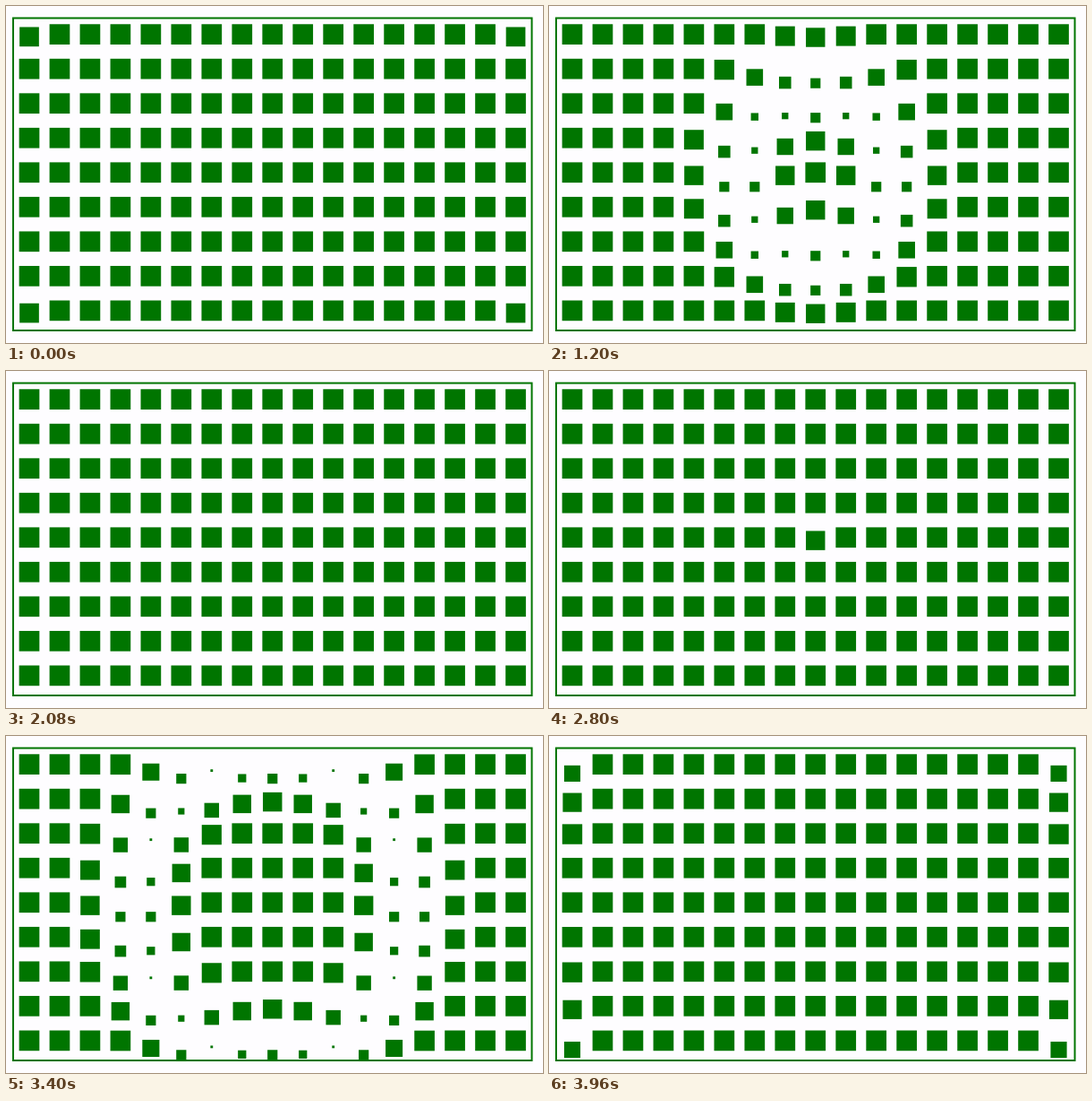
An HTML page for the animation above (4000 ms loop, 600x376 px).

```html
<!DOCTYPE html>
<html lang="en">
<head>
<meta charset="utf-8">
<title>Staggered grid</title>
<style>
  html, body { margin: 0; width: 100%; height: 100%; overflow: hidden; background: #fefdff; }
  svg { display: block; }
</style>
</head>
<body>
<svg id="stage" width="600" height="376" viewBox="0 0 600 376">
  <rect x="8" y="13.5" width="579.5" height="348.5" fill="none" stroke="#007500" stroke-width="2"/>
  <g id="grid" fill="#007500"></g>
</svg>
<script>
const COLS = 17, ROWS = 9, SIZE = 22.7;
const PITCH_X = 33.97, PITCH_Y = 38.53;
const CENTER_X = 297.75, CENTER_Y = 185.75;
const LOOP = 2000, START = 750, STAGGER = 100, HALF = 200;
const MIN_SCALE = 0.1, DROP = 64;

const grid = document.getElementById('grid');
const cells = [];

for (let row = 0; row < ROWS; row++) {
  for (let col = 0; col < COLS; col++) {
    const dx = col - (COLS - 1) / 2;
    const dy = row - (ROWS - 1) / 2;
    const el = document.createElementNS('http://www.w3.org/2000/svg', 'rect');
    grid.appendChild(el);
    cells.push({
      el,
      x: CENTER_X + dx * PITCH_X,
      y: CENTER_Y + dy * PITCH_Y,
      delay: START + STAGGER * Math.hypot(dx, dy)
    });
  }
}

// Quadratic shrink to MIN_SCALE, then the mirrored growth back to 1.
function scaleAt(t) {
  if (t >= 2 * HALF) return 1;
  const p = 1 - Math.abs(t - HALF) / HALF;
  return 1 - (1 - MIN_SCALE) * p * p;
}

function render(ms) {
  // 40 ms steps showing the latest 60 Hz tick
  const step = Math.floor(ms / 40 + 1e-6) * 40;
  const time = Math.floor(step * 0.06 + 1e-6) / 0.06;
  for (const { el, x, y, delay } of cells) {
    const local = (((time - delay) % LOOP) + LOOP) % LOOP;
    const s = scaleAt(local);
    const size = SIZE * s;
    // The offset is applied inside the scaled space, so it shrinks with s.
    const drop = s * DROP * (1 - s);
    el.setAttribute('x', x - size / 2);
    el.setAttribute('y', y + drop - size / 2);
    el.setAttribute('width', size);
    el.setAttribute('height', size);
  }
}

let origin = null;
function tick() {
  const now = performance.now();
  if (origin === null) origin = now;
  render((now - origin) % LOOP);
  requestAnimationFrame(tick);
}

render(0);
requestAnimationFrame(tick);
</script>
</body>
</html>
```
